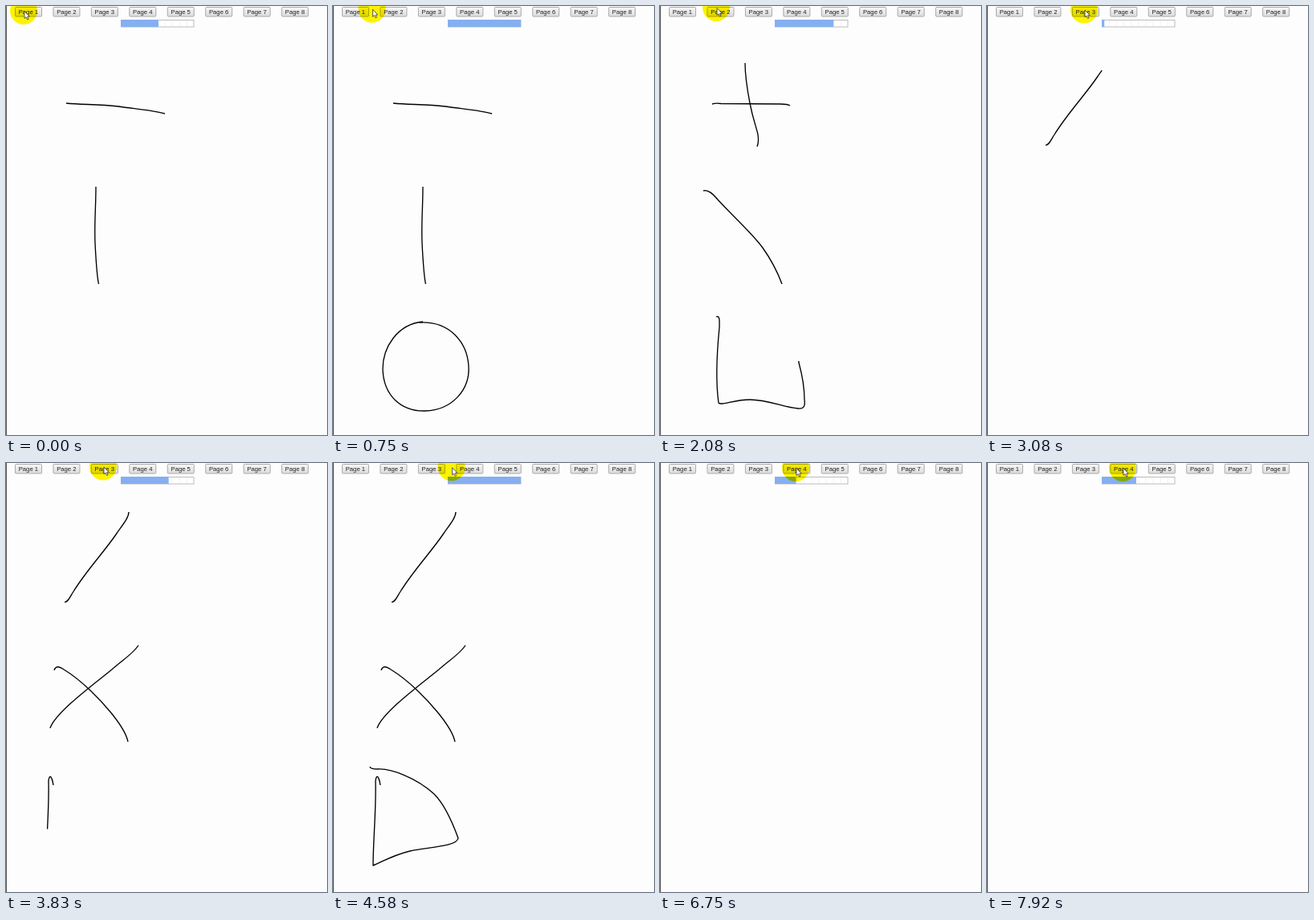
These frames come from a looping animation (400x534 px, 8000 ms). An HTML page:

```html
<!DOCTYPE html>
<html lang="en">
<head>
<meta charset="utf-8">
<title>Drawing pages</title>
<style>
html, body { margin: 0; width: 100%; height: 100%; overflow: hidden; background: #fdfdfd; }
svg { display: block; width: 400px; height: 534px; background: #fdfdfd; }
text { font: 7.7px "Liberation Sans", Arial, sans-serif; fill: #222; text-anchor: middle; }
.ink path { fill: none; stroke: #000; stroke-width: 1.35; stroke-linejoin: round; }
#glow { fill: #fff500; mix-blend-mode: multiply; }
</style>
</head>
<body>
<svg viewBox="0 0 400 534">
  <defs>
    <linearGradient id="face" x2="0" y2="1">
      <stop stop-color="#f6f6f6"/><stop offset="1" stop-color="#dcdcdc"/>
    </linearGradient>
  </defs>
  <path d="M.5 0V534" stroke="#555"/>
  <g id="buttons"></g>
  <rect x="143.5" y="17.5" width="90.5" height="8.5" fill="#fff" stroke="#bcbcbc"/>
  <path d="M152 21.5H233" stroke="#f1f1f1" stroke-width="7" stroke-dasharray="1 8.1"/>
  <rect id="bar" x="143" y="17" height="9" fill="#86aff0"/>
  <g id="ink" class="ink"></g>
  <circle id="glow" r="17"/>
  <path id="cursor" d="M0 0V9L2 7.2L3.5 10.5L5 9.8L3.6 6.7H6.3Z" fill="#fff" stroke="#333" stroke-width=".8"/>
</svg>
<script>
const LOOP = 8000, STEP = 1000 / 12;
const $ = id => document.getElementById(id);
const clamp = v => Math.max(0, Math.min(1, v));

// Each stroke: start and end as a share of its page's playback, then the path.
const pages = [
  { start: -534, end: 500, strokes: [
    [0, .25, "M75 121C95 123 115 122 140 125C160 128 185 130 198 134"],
    [.27, .5, "M112 225C112 250 110 270 111 295C112 315 113 335 115.500 346"],
    [.55, 1, "M112 393C80 396 62 425 62 452C63 485 85 505 115 504C148 503 171 478 169 448C167 418 145 392 108 394"]] },
  { start: 1066, end: 2330, strokes: [
    [0, .15, "M65 122C68 121 72 121 76 121.500L150 122C156 122 159 122 162 124"],
    [.155, .32, "M106 71C106 82 107 95 112 121C116 142 120 150 122 160C123 166 123 170 121 175"],
    [.33, .47, "M54 230C60 228 66 234 72 241C95 266 115 283 128 301C138 315 146 330 152 346"],
    [.48, .98, "M70 387C75 384 74 394 74 400C71 430 69 465 73 494C76 498 92 490 112 490C135 490 155 500 172 501C180 502 181 497 180 490C180 475 176 455 173 444C170 425 170 405 170 390C140 386 110 388 73 390"]] },
  { start: 3040, end: 4250, strokes: [
    [0, .0425, "M73 173C77 174 80 166 84 160C100 134 122 111 137 89C146 76 153 68 153 61"],
    [.08, .28, "M60 258C62 252 66 253 72 257C95 271 118 295 131 311C144 327 150 337 152 347"],
    [.33, .52, "M165 227C158 238 145 245 132 257C110 275 62 310 55 330"],
    [.57, 1, "M59 401C57 389 54 387 53 396C54 430 50 470 50 501C60 497 75 488 96 483C120 478 155 477 156 467C148 445 139 425 126 412C104 392 72 380 56 381C50 381 46 380 46 378"]] },
  { start: 4871, end: 11325, strokes: [] }
];

// Pointer stops: departure time of the move leading there, x, y.
const stops = [[0, 22, 6], [667, 70, 2], [2583, 121, 4.5], [4500, 169, 6]];

$("buttons").innerHTML = Array.from({ length: 8 }, (_, i) => {
  const x = 11.5 + 47.45 * i;
  return `<rect x="${x}" y="1.5" width="33" height="11.500" rx="1" fill="url(#face)" stroke="#aaa"/>
    <text x="${x + 16.4}" y="9.8">Page ${i + 1}</text>`;
}).join("");

$("ink").innerHTML = pages.map(page =>
  `<g>${page.strokes.map(s => `<path pathLength="1" d="${s[2]}"/>`).join("")}</g>`).join("");
const layers = [...$("ink").children];

function pointerAt(t) {
  let [, x, y] = stops[0];
  for (const [time, nx, ny] of stops.slice(1)) {
    const k = 1 - (1 - clamp((t - time) / 250)) ** 2;
    x += (nx - x) * k;
    y += (ny - y) * k;
  }
  return [x, y];
}

function draw(t) {
  const current = pages.findLastIndex(page => t >= page.start);
  const { start, end, strokes } = pages[current];
  const progress = clamp((t - start) / (end - start));
  $("bar").setAttribute("width", 91 * progress);
  layers.forEach((layer, i) => layer.style.display = i === current ? "" : "none");
  strokes.forEach(([from, to], i) => {
    const drawn = clamp((progress - from) / (to - from));
    layers[current].children[i].setAttribute("stroke-dasharray", drawn < 1 ? `${drawn} 2` : "none");
  });
  const [x, y] = pointerAt(t);
  $("glow").setAttribute("transform", `translate(${x} ${y})`);
  $("cursor").setAttribute("transform", `translate(${x + 1} ${y + .5})`);
}

function tick() {
  const t = performance.now() % LOOP;
  draw(Math.floor((t + 5) / STEP) % 96 * STEP);
  requestAnimationFrame(tick);
}
tick();
</script>
</body>
</html>
```
